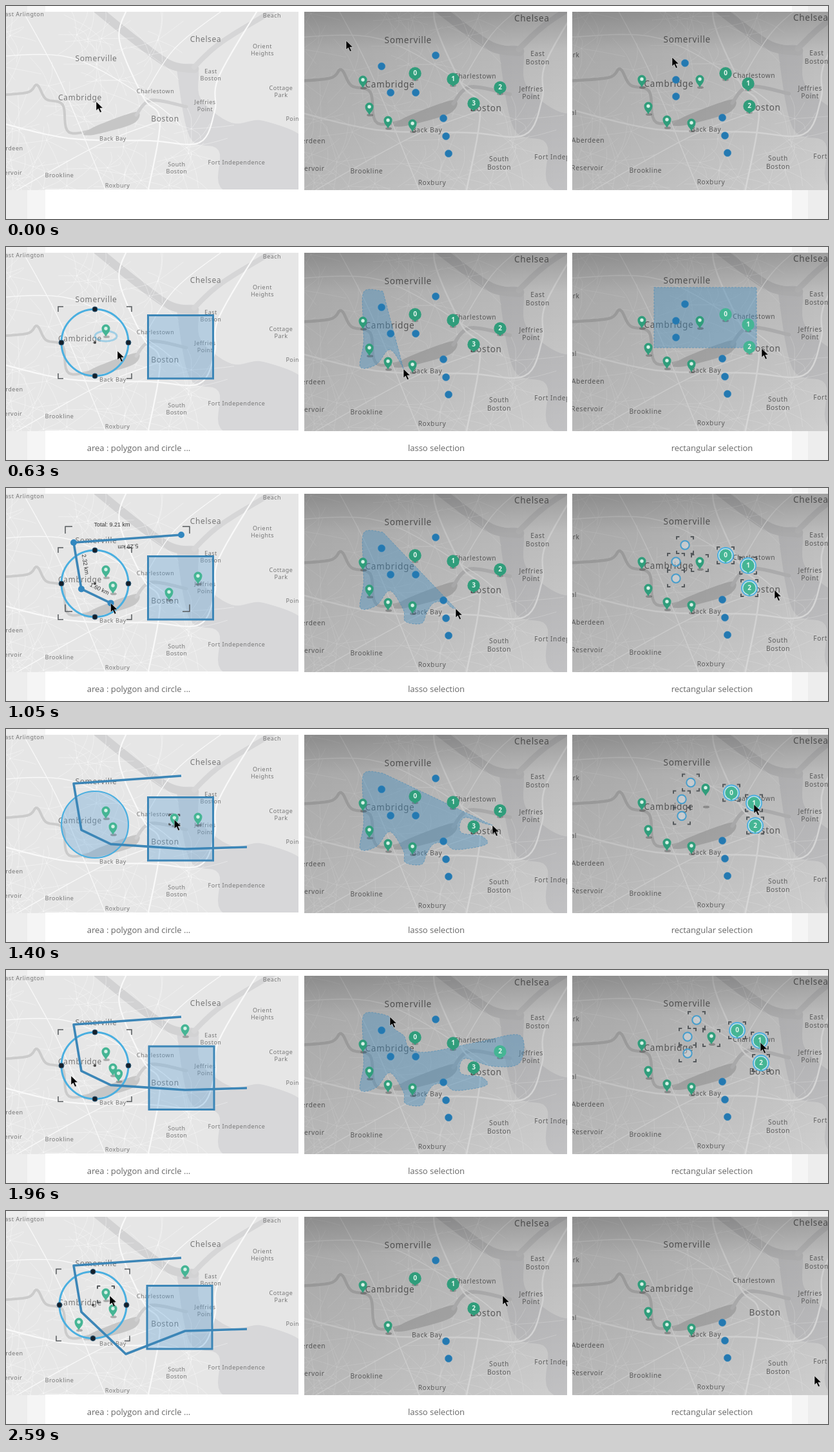
An HTML page with a canvas for the animation above (2.66 s loop, 1276 by 332 pixels).

```html
<!DOCTYPE html>
<html lang="en">
<head>
<meta charset="utf-8">
<title>Map selection</title>
<style>
html, body { margin: 0; width: 100%; height: 100%; overflow: hidden; background: #fff; }
canvas { display: block; width: 1276px; height: 332px; }
</style>
</head>
<body>
<canvas id="stage" width="1276" height="332"></canvas>
<script>
const W = 1276, H = 332, TICK = 70, TICKS = 38;
const stage = document.getElementById('stage').getContext('2d');
const backdrop = document.createElement('canvas');
backdrop.width = W;
backdrop.height = H;
let c = backdrop.getContext('2d');

// ---------- geometry and time ----------
const add = (p, q) => [p[0] + q[0], p[1] + q[1]];
const mix = (p, q, f) => p.map((v, i) => v + (q[i] - v) * f);
const within = (k, a, b) => k >= a && k < b;

// Straight move from p to q between ticks a and b.
const move = (k, a, b, p, q) => mix(p, q, Math.min(1, Math.max(0, (k - a) / (b - a))));

// A route is a list of [tick, point].
function follow(route, k) {
  const i = route.findIndex(stop => stop[0] > k);
  if (i < 1) return route.at(i)[1];
  const [a, p] = route[i - 1], [b, q] = route[i];
  return move(k, a, b, p, q);
}

// Catmull-Rom point on a smooth path, u counted in points.
function spline(pts, u) {
  const i = Math.floor(u), f = u - i;
  const [a, b, d, e] = [-1, 0, 1, 2].map(j => pts[Math.min(pts.length - 1, Math.max(0, i + j))]);
  return b.map((v, j) => v + f / 2 * (d[j] - a[j] + f * (2 * a[j] - 5 * v + 4 * d[j] - e[j]
    + f * (3 * (v - d[j]) + e[j] - a[j]))));
}

function smooth(pts, end = pts.length - 1) {
  const out = [];
  for (let u = 0; u < end; u += .125) out.push(spline(pts, u));
  return [...out, spline(pts, end)];
}

// ---------- drawing helpers ----------
function paint(fill, stroke, width = 1) {
  if (fill) { c.fillStyle = fill; c.fill(); }
  if (stroke) { c.strokeStyle = stroke; c.lineWidth = width; c.stroke(); }
}

function trace(pts, close) {
  c.beginPath();
  pts.forEach(p => c.lineTo(...p));
  if (close) c.closePath();
}

function oval(x, y, rx, ry, fill, stroke, width) {
  c.beginPath();
  c.ellipse(x, y, rx, ry, 0, 0, 7);
  paint(fill, stroke, width);
}

const disc = (x, y, r, ...style) => oval(x, y, r, r, ...style);

function text(s, x, y, font, color, align = 'center', gap = 0) {
  c.font = font;
  c.letterSpacing = gap + 'px';
  c.fillStyle = color;
  c.textAlign = align;
  c.textBaseline = 'middle';
  c.fillText(s, x, y);
}

function corners(x0, y0, x1, y1, n = 8, width = 1.5) {
  for (const [x, sx] of [[x0, n], [x1, -n]])
    for (const [y, sy] of [[y0, n], [y1, -n]]) {
      trace([[x + sx, y], [x, y], [x, y + sy]]);
      paint(null, '#55595c', width);
    }
}

const around = (x, y, r = 13) => corners(x - r, y - r, x + r, y + r, r / 3, 2);

function clipTo(x, w, draw) {
  c.save();
  c.beginPath();
  c.rect(x, 9, w, 278);
  c.clip();
  draw();
  c.restore();
}

// ---------- map ----------
const towns = [['Cambridge', 115, 145], ['Somerville', 140, 84], ['Boston', 247, 178], ['Chelsea', 310, 54]];
const places = [
  ['Charlestown', 232, 134], ['Back Bay', 166, 208], ['Brookline', 83, 265], ['Roxbury', 173, 281],
  ['Reservoir', 3, 261], ['Aberdeen', 4, 223], ['East Arlington', 26, 14], ['East\nBoston', 318, 103],
  ['Jeffries\nPoint', 309, 151], ['South\nBoston', 265, 248], ['Orient\nHeights', 398, 64],
  ['Cottage\nPark', 427, 129], ['Orchard\nBeach', 413, 5], ['Fort Independence', 358, 245],
  ['Point Shirley', 464, 177], ['Park', -18, 105], ['Hospital', -31, 185]
];
const highways = [
  [[188, 5], [176, 55], [213, 143], [239, 180], [220, 292]],
  [[-20, 180], [96, 207], [224, 211], [300, 214], [324, 165], [330, 112], [392, 5]],
  [[213, 143], [262, 67], [340, 5]],
  [[-20, 80], [103, 82], [226, 150], [270, 186]],
  [[10, 292], [143, 218], [240, 180]],
  [[24, 5], [86, 122], [156, 292]]
];

function rng(seed) {
  return () => (seed = (seed * 16807) % 2147483647) / 2147483647;
}

// Streets fan out from a few random squares.
function streets() {
  const rnd = rng(4127);
  for (let hub = 0; hub < 36; hub++) {
    const x = -20 + rnd() * 310, y = 35 + rnd() * 250, turn = rnd() * 3;
    for (let i = 0; i < 7; i++) {
      const a = turn + i * .9 + rnd() * .4, n = 20 + rnd() * 50;
      const mid = [x + Math.cos(a) * n / 2 + rnd() * 8, y + Math.sin(a) * n / 2];
      trace(smooth([[x, y], mid, [x + Math.cos(a) * n, y + Math.sin(a) * n]]));
      paint(null, 'rgba(255,255,255,.45)', .8);
    }
  }
}

function drawMap(ink) {
  const river = (color, width, ...pts) => { trace(smooth(pts)); paint(null, color, width); };
  const area = (color, ...pts) => { trace(smooth([...pts, pts[0]]), true); paint(color); };
  c.lineCap = c.lineJoin = 'round';
  c.fillStyle = '#e6e6e6';
  c.fillRect(-40, 0, 520, 310);
  area('#d7d7d9', [264, 93], [297, 95], [302, 145], [350, 183], [400, 180], [470, 215],
    [470, 300], [340, 290], [330, 226], [285, 205]);
  river('#d2d2d3', 13, [140, 5], [203, 56], [254, 92], [293, 99]);
  river('#d6d6d7', 8, [292, 96], [335, 57], [420, 5]);
  streets();
  river('#cbcbcb', 4, [-30, 141], [32, 136], [48, 124], [62, 146], [88, 155], [98, 198], [150, 190]);
  area('#c6c6c6', [118, 202], [140, 188], [202, 166], [198, 184], [140, 201]);
  river('#cfcfd0', 5, [202, 171], [225, 148], [280, 158]);
  highways.forEach((way, i) => river('#f9f9f9', i < 2 ? 2.2 : 1.3, ...way));
  for (const [s, x, y] of towns) text(s, x, y, '12px "Noto Sans", sans-serif', ink, 'center', .6);
  for (const [s, x, y] of places)
    s.split('\n').forEach((line, i) => text(line, x, y + i * 11, '9px "Noto Sans", sans-serif', ink, 'center', .5));
}

function shade(x, w, x1, y1, stops) {
  const g = c.createLinearGradient(x, 9, x1, y1);
  stops.forEach((a, i) => g.addColorStop([0, .22, 1][i], `rgba(0,0,0,${a})`));
  c.fillStyle = g;
  c.fillRect(x, 9, w, 278);
}

function panel(x, w, scale, dx, dy) {
  clipTo(x, w, () => {
    c.save();
    c.translate(dx, dy);
    c.scale(scale, scale);
    drawMap(scale > 1 ? '#6b6b6b' : '#777');
    c.restore();
    if (scale === 1) return;
    shade(x, w, x, 287, [.31, .17, .09]);
    shade(x, w, x + w, 9, [.12, .1, .01]);
  });
}

function drawBackdrop() {
  c.fillStyle = '#fff';
  c.fillRect(0, 0, W, H);
  for (const [x, w, a] of [[0, 33, .07], [33, 28, .04], [1220, 25, .04], [1245, 31, .07]]) {
    c.fillStyle = `rgba(0,0,0,${a})`;
    c.fillRect(x, 0, w, H);
  }
  panel(0, 454, 1, 0, -1);
  c.fillStyle = '#fff';
  c.fillRect(61, 286, 400, 1);
  panel(463, 408, 1.13, 466, -41);
  panel(879, 397, 1.13, 899, -42);
}

// ---------- markers ----------
const GREEN = '#309d7b', MINT = '#45b594', BLUE = '#2479b1', LINE = '#3c86b7', SKY = '#4aafe0';
const AREA = 'rgba(100,165,212,.36)', PICK = 'rgba(74,143,190,.43)';

function pin(x, y, color = GREEN, lift = 0) {
  oval(x + 1, y + 10, 5, 2, 'rgba(0,0,0,.25)');
  c.save();
  c.translate(x, y - lift);
  c.beginPath();
  c.arc(0, -3, 6.5, Math.PI, 0);
  c.bezierCurveTo(6.5, 3, 2, 5, 0, 10);
  c.bezierCurveTo(-2, 5, -6.5, 3, -6.5, -3);
  paint(color);
  disc(0, -3, 2.7, '#d8f1e7');
  c.restore();
}

function badge(n, x, y, color = GREEN, on) {
  oval(x, y + 10, 5, 2, 'rgba(0,0,0,.22)');
  if (on) {
    around(x, y);
    disc(x, y, 12, '#c9e4ef', SKY, 1.8);
  }
  trace([[x - 4, y + 7], [x + 4, y + 7], [x, y + 12]], true);
  paint(color);
  disc(x, y, 9.7, color);
  text(n, x, y + .5, 'bold 10px "Open Sans", sans-serif', '#e4f5ee');
}

function dot(x, y, on) {
  if (!on) return disc(x, y, 5.7, BLUE, 'rgba(60,140,190,.45)', 1);
  disc(x, y, 6.7, 'rgba(225,235,242,.4)', '#459dcc', 2);
  around(x, y);
}

function cursor(p) {
  const shape = [[0, 0], [0, 14], [3.3, 11], [6, 17], [8.4, 16], [5.7, 10.3], [10.3, 10]];
  trace(shape.map(q => add(p, q)), true);
  c.lineJoin = 'miter';
  paint('#000', 'rgba(255,255,255,.6)', .8);
}

// ---------- left panel: areas, pins and a measured line ----------
const hub = [138, 149], R = 52;
const box = [220.5, 106.5], size = [101, 98.5];
const spots = [[155, 130], [166, 155], [253, 165], [298, 140]];
const aside = [278, 94], inside = [113, 176], pulled = [186, 223];
const vertices = [[272, 73], [105, 85], [117, 157.4], [162.6, 179.4], [278, 187], [374, 184]];
const LINE_AT = 12;

const leftHand = [[0, [140, 149]], [1, hub], [4, add(hub, [R, 0])], [5, box], [7, add(box, size)],
  [9, [173, 162]], [10, spots[1]], [11, spots[3]],
  ...vertices.map((p, i) => [LINE_AT + i, p]),
  [19, spots[2]], [22, aside], [24, [269, 124]], [25, [270, 136]], [26, spots[3]],
  [28, [101, 165]], [29, inside], [30, vertices[3]], [32, pulled], [33, [170, 181]],
  [35, hub], [36, add(hub, [-3, -3])], [37, [161, 132]]];

const nudge = k => move(k, 35, 36, [0, 0], [-3, -2.5]);

function drawCircle(k) {
  const [x, y] = add(hub, nudge(k)), [r] = move(k, 1, 4, [3], [R]), on = !within(k, 17, 27);
  disc(x, y, r, on ? null : AREA, SKY, on ? 3 : 2.2);
  if (!on) return;
  corners(x - r - 5, y - r - 4, x + r + 5, y + r + 4);
  for (let i = 0; i < 4; i++)
    disc(x + r * Math.cos(i * Math.PI / 2), y + r * Math.sin(i * Math.PI / 2), 4, '#16202a', '#2c5c7c');
  disc(x, y, 2, '#444');
}

function drawSquare(k) {
  const [x, y] = add(add(box, move(k, 24, 25, [0, 0], [1.5, 12.5])), nudge(k));
  const [w, h] = move(k, 5, 7, [2, 2], size);
  c.lineJoin = 'miter';
  c.beginPath();
  c.rect(x, y, w, h);
  paint(AREA, LINE, 3);
  if (!within(k, 22, 26)) return;
  corners(x - 10, y - 9, x + w + 10, y + h + 9, 12, 2);
  for (const px of [x, x + w]) for (const py of [y, y + h]) disc(px, py, 4, '#17242f');
  disc(x + w / 2, y + h / 2, 2, '#333');
}

function drawLine(k) {
  const pts = vertices.slice(0, Math.floor(k - LINE_AT) + 1);
  if (k > 30) pts[3] = move(k, 30, 32, vertices[3], pulled);
  c.lineJoin = 'round';
  c.lineCap = 'butt';
  trace(pts);
  paint(null, LINE, 3.6);
  if (k < 18) measure(pts);
}

function measure(pts) {
  const xs = pts.map(p => p[0]), ys = pts.map(p => p[1]);
  const x0 = Math.min(...xs), x1 = Math.max(...xs), y0 = Math.min(...ys);
  const label = (s, x, y) => text(s, x, y, '9px "Liberation Sans", Arial, sans-serif', '#333');
  corners(x0 - 13, y0 - 13, x1 + 13, Math.max(...ys) + 13, 11);
  let total = 0;
  pts.forEach(([x, y], i) => {
    disc(x, y, 5, '#3287bf');
    if (!i) return;
    const [px, py] = pts[i - 1], km = Math.hypot(x - px, y - py) * .0316;
    total += km;
    c.save();
    c.translate((x + px) / 2, (y + py) / 2);
    c.rotate(Math.atan2(y - py, x - px));
    label(km.toFixed(2) + ' km', 0, -12);
    c.restore();
  });
  if (total) label(`Total: ${total.toFixed(2)} km`, (x0 + x1) / 2 - 24, y0 - 15);
}

function drawLeft(k) {
  if (k >= 1) drawCircle(k);
  if (k >= 5) drawSquare(k);
  if (k >= LINE_AT) drawLine(k);
  if (within(k, 8, 10)) oval(155, 139, 17, 8, null, 'rgba(74,175,224,.45)', 3);
  const now = [...spots];
  now[2] = move(k, 19, 22, spots[2], aside);
  now[3] = move(k, 26, 29, spots[3], inside);
  now.forEach((p, i) => { if (k >= 8 + i + (i > 0)) pin(...p, MINT); });
  if (within(k, 19, 25)) around(...now[2], 8);
  if (k >= 37) around(...spots[0]);
  cursor(follow(leftHand, k));
}

// ---------- middle and right panels share their fixed markers ----------
const pins = [[554, 118], [593, 181], [564, 160], [631, 186]];
const dots = [[683, 203], [687, 230], [679, 175]];

// One path point per tick.
const lasso = [[585, 69], [556, 69], [554, 110], [555, 150], [550, 187], [575, 183], [596, 160],
  [617, 190], [620, 208], [645, 211], [653, 194], [664, 179], [682, 178], [698, 188], [745, 180],
  [738, 167], [706, 161], [712, 138], [755, 150], [797, 145], [798, 102], [735, 112], [653, 128],
  [625, 120], [618, 103], [601, 90], [596, 73]];
const LASSO_AT = 2, LASSO_END = LASSO_AT + lasso.length - 1;

function dashed(pts) {
  trace(pts, true);
  c.setLineDash([3, 2]);
  paint(PICK, 'rgba(72,138,182,.65)');
  c.setLineDash([]);
}

function drawMiddle(k) {
  const on = k >= 30, gone = k >= 35;
  const d = move(k, 31, 33, [0, 0], [3, 3]), lift = d[0] * 3;
  const u = Math.max(0, Math.min(k - LASSO_AT, lasso.length - 1));
  if (within(k, LASSO_AT, 30)) dashed(smooth(lasso, u));

  for (const p of [...dots.slice(0, 2), [667, 77]]) dot(...p);
  pins.slice(0, 2).forEach(p => pin(...p));
  if (!gone) {
    for (const p of [dots[2], [583, 94], [597, 135], [636, 135]]) dot(...add(p, d), on);
    pins.slice(2).forEach(p => pin(...add(p, d), GREEN, lift));
    badge('2', ...add([767, 127], d), k >= 21 ? MINT : GREEN, on);
  }
  badge('0', 635, 105);
  badge('1', 694, 114);
  badge(gone ? '2' : '3', 726, 152);

  if (k < LASSO_AT) cursor(move(k, 0, LASSO_AT, [528, 54], lasso[0]));
  else if (k <= LASSO_END) cursor(spline(lasso, u));
  else cursor(move(k, LASSO_END, 31, lasso.at(-1), [771, 132]));
}

const from = [573, 64], to = [732, 158], grip = [719, 124], shift = [18, -11];
const rightHand = [[0, [601, 81]], [1, [601, 81]], [3, from], [8, to], [9, [740, 159]], [15, [760, 160]],
  [18, grip], [22, add(grip, shift)], [33, [739, 115]], [37, [822, 258]]];

function drawRight(k) {
  const on = k >= 10, tip = follow(rightHand, k);
  const d = move(k, 18, 22, [0, 0], shift);
  if (within(k, 3, 10)) {
    const x = Math.min(tip[0], to[0]), y = Math.min(tip[1], to[1]);
    dashed([from, [x, from[1]], [x, y], [from[0], y]]);
  }
  dots.forEach(p => dot(...p));
  pins.forEach(p => pin(...p));
  if (k < 31) {
    const color = k >= 7 ? MINT : GREEN, lift = within(k, 19, 25) ? 17 : 0;
    for (const p of [[621, 90], [607, 116], [607, 142]]) dot(...add(p, d), on);
    const held = add([644, 118], d);
    if (on && !lift) around(...held);
    pin(...held, GREEN, lift);
    [[684, 106], [719, 122], [721, 157]].forEach((p, i) => badge(String(i), ...add(p, d), color, on));
  }
  cursor(tip);
}

// ---------- stage ----------
function render(k) {
  c = stage;
  c.drawImage(backdrop, 0, 0);
  clipTo(0, 454, () => drawLeft(k));
  clipTo(463, 408, () => drawMiddle(k));
  clipTo(879, 397, () => {
    c.translate(433, -1);
    drawRight(k);
  });
  if (k < 1) return;
  const caption = (s, x) => text(s, x, 314.5, '13px "Open Sans", sans-serif', '#666');
  caption('area : polygon and circle ...', 206);
  caption('lasso selection', 668);
  caption('rectangular selection', 1096);
}

drawBackdrop();
const start = performance.now();
function loop() {
  render(Math.floor((performance.now() - start) / TICK) % TICKS);
  requestAnimationFrame(loop);
}
loop();
</script>
</body>
</html>
```
